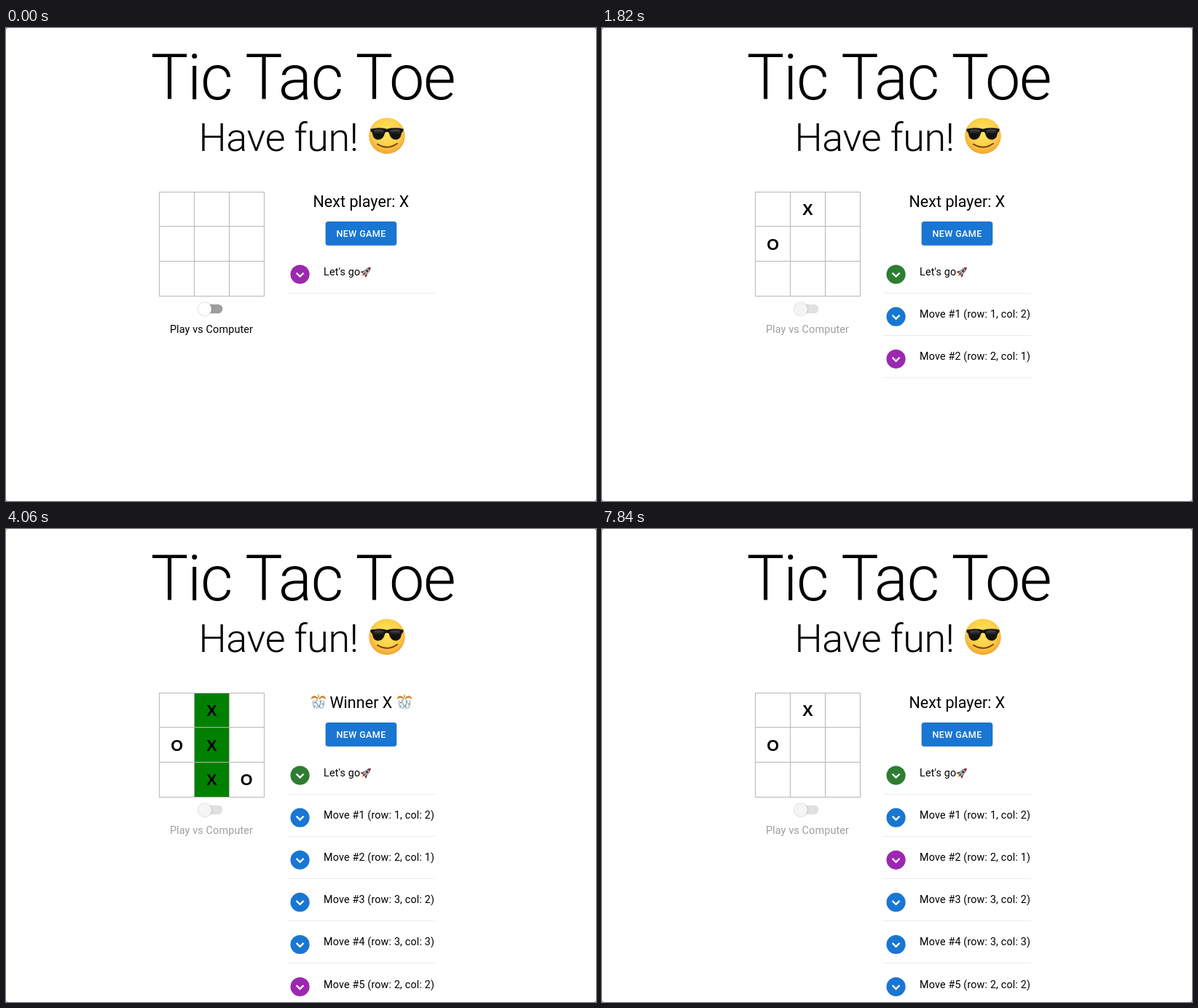
These frames come from a looping animation (810x650 px, 8000 ms). An HTML page:

```html
<!DOCTYPE html>
<html lang="en">
<head>
<meta charset="utf-8">
<title>Tic Tac Toe</title>
<style>
  html, body { margin: 0; width: 100%; height: 100%; overflow: hidden; background: #8a8a8a; }
  svg { display: block; width: 810px; height: 650px; font-family: Roboto, sans-serif; }
  .mid { text-anchor: middle; }
  .h1 { font-size: 86.4px; font-weight: 300; letter-spacing: -.01562em; }
  .h2 { font-size: 54px; font-weight: 300; letter-spacing: -.00833em; }
  .h5 { font-size: 21.6px; }
  .body { font-size: 14.4px; letter-spacing: .00938em; }
  .button { font-size: 12.6px; font-weight: 500; letter-spacing: .02857em; fill: #fff; }
  .mark { font: bold 21.6px "Liberation Sans", Arial, sans-serif; }
  .raised { filter: drop-shadow(0 .8px 1px rgba(0, 0, 0, .28)); }
</style>
</head>
<body>
<svg viewBox="0 0 810 650">
  <defs>
    <radialGradient id="skin" cx=".5" cy=".4" r=".62">
      <stop offset="0" stop-color="#ffe65c"/>
      <stop offset=".6" stop-color="#fdd04a"/>
      <stop offset="1" stop-color="#f0a030"/>
    </radialGradient>
    <linearGradient id="lens" x2="0" y2="1">
      <stop offset="0" stop-color="#4a4a4c"/>
      <stop offset=".5" stop-color="#111"/>
    </linearGradient>
    <g id="popper">
      <circle cx="0" cy="3" r="7.6" fill="#eef2f5"/>
      <path d="M-7 -2Q-9 4-5 9M7 -2Q9 4 5 9" fill="none" stroke="#a9bccb" stroke-width="1.5"/>
      <path d="M-1 -4Q-5 0-2 3T-3 9M2 -3Q5 1 2 4T4 9" fill="none" stroke="#76a7d2" stroke-width="1.1"/>
      <path d="M-1 -5C-5 -11-10 -9-10.5 -3C-7 -6-4 -6-1 -3ZM1 -5C5 -11 10 -9 10.5 -3C7 -6 4 -6 1 -3Z" fill="#dfa044"/>
      <path d="M-9 -5Q-5 -9-1 -5M9 -5Q5 -9 1 -5" fill="none" stroke="#a96f28" stroke-width=".8"/>
      <path d="M0 -10V-5" stroke="#c58a3a" stroke-width="1.3"/>
      <g fill="#d9534f"><circle cx="-5" cy="1" r="1"/><circle cx="1" cy="6" r="1"/><circle cx="6" cy="3" r="1"/></g>
      <g fill="#58a65c"><circle cx="-5" cy="6" r=".9"/><circle cx="3" cy="0" r=".9"/></g>
    </g>
    <g id="rocket" transform="rotate(45)">
      <path d="M-1.6 4L0 9L1.6 4Z" fill="#e59a2c"/>
      <path d="M-2.5 -1L-5.5 4V6L-2 4ZM2.5 -1L5.5 4V6L2 4Z" fill="#7d2a27"/>
      <path d="M0 -10Q4.4 -4 2.6 4.5H-2.6Q-4.4 -4 0 -10Z" fill="#b4b9bf" stroke="#565c63" stroke-width=".8"/>
      <path d="M0 -10Q1.8 -8 2.4 -5.8H-2.4Q-1.8 -8 0 -10Z" fill="#8f302b"/>
      <circle cy="-2.6" r="1.7" fill="#222c3a"/>
      <path d="M0 1V5" stroke="#5c201d" stroke-width="1.4"/>
    </g>
  </defs>

  <rect width="810" height="650" rx="3" fill="#fff"/>
  <text class="h1 mid" x="407.5" y="97.5">Tic Tac Toe</text>
  <text class="h2" x="264.6" y="168.5">Have fun!</text>

  <g transform="translate(523 148.2)">
    <circle r="24.8" fill="url(#skin)"/>
    <path d="M-13 11.5Q1 20 14 10.500" fill="none" stroke="#7a4313" stroke-width="2" stroke-linecap="round"/>
    <g transform="translate(0 -.5) scale(.95 .9)">
      <path d="M-24 -10Q-12 -13 0 -10Q12 -13 24 -10L23.4 -6Q21.5 -6 20.5 -1C19 9 5.5 10 3 -4Q0 -7-3 -4C-5.5 10-19 9-20.5 -1Q-21.5 -6-23.4 -6Z" fill="#151515"/>
      <path d="M-19 -8.5Q-11 -10.5-4.5 -8Q-5 5-12 5Q-19 4-19 -8.5ZM19 -8.5Q11 -10.5 4.5 -8Q5 5 12 5Q19 4 19 -8.5Z" fill="url(#lens)"/>
    </g>
  </g>

  <rect id="win" x="258.5" y="225.5" width="48" height="143" fill="#008000"/>
  <path d="M210.5 225V369M258.5 225V369M306.5 225V369M354.5 225V369M210 225.5H355M210 272.5H355M210 320.5H355M210 368.5H355" fill="none" stroke="#b6b6b6"/>
  <g id="marks" class="mark mid"></g>

  <rect id="track" x="266.8" y="379.7" width="30.6" height="12.6" rx="6.3"/>
  <circle id="thumb" class="raised" cx="273" cy="386.2" r="9"/>
  <text id="label" class="body mid" x="282" y="418.5">Play vs Computer</text>

  <text id="status" class="h5 mid" x="487.4" y="245.7"></text>
  <g id="cheer">
    <use href="#popper" x="429" y="237.5"/>
    <use href="#popper" x="547" y="237.5"/>
  </g>
  <rect class="raised" x="438.8" y="266" width="97.4" height="32.8" rx="3.6" fill="#1976d2"/>
  <text class="button mid" x="487.6" y="287">NEW GAME</text>
  <g id="list"></g>
</svg>

<script>
  const LOOP = 8000;
  // row, column
  const MOVES = [[1, 2], [2, 1], [3, 2], [3, 3], [2, 2]];
  // start in ms, current move, moves listed, track grey
  const STEPS = [
    [0, 0, 0, 158],
    [840, 1, 1, 180],
    [910, 1, 1, 208],
    [1820, 2, 2, 224],
    [2870, 3, 3, 224],
    [3500, 4, 4, 224],
    [4060, 5, 5, 224],
    [6370, 4, 5, 224],
    [7000, 3, 5, 224],
    [7840, 2, 5, 224]
  ];

  const $ = id => document.getElementById(id);
  const show = (el, on) => el.setAttribute("visibility", on ? "visible" : "hidden");
  const player = i => i % 2 ? "O" : "X";

  function add(parent, tag, attrs, text = "") {
    const el = document.createElementNS("http://www.w3.org/2000/svg", tag);
    for (const key in attrs) el.setAttribute(key, attrs[key]);
    el.textContent = text;
    return parent.appendChild(el);
  }

  const marks = MOVES.map(([row, col], i) => add($("marks"), "text", {
    x: 234.6 + (col - 1) * 47.8,
    y: 257 + (row - 1) * 47.7
  }, player(i)));

  const items = [null, ...MOVES].map((move, i) => {
    const group = add($("list"), "g", { transform: `translate(0 ${i * 58.1})` });
    const dot = add(group, "circle", { cx: 403.6, cy: 338.6, r: 13.1 });
    add(group, "path", {
      d: "M7.41 8.59 12 13.17l4.59-4.58L18 10l-6 6-6-6z",
      transform: "translate(392.8 328.4) scale(.9)",
      fill: "#fff",
      stroke: "#fff",
      "stroke-width": .8
    });
    const text = move ? `Move #${i} (row: ${move[0]}, col: ${move[1]})` : "Let's go";
    add(group, "text", { class: "body", x: 436, y: 340 }, text);
    if (!move) add(group, "use", { href: "#rocket", transform: "translate(494 335.5) scale(.92)" });
    const y = 364.5 + Math.round(i * 58.1) - i * 58.1;
    add(group, "path", { d: `M386.5 ${y}H589`, stroke: "#ebebeb" });
    return { group, dot };
  });

  function draw([, now, total, grey]) {
    const won = now === MOVES.length;
    marks.forEach((mark, i) => show(mark, i < now));
    items.forEach(({ group, dot }, i) => {
      show(group, i <= total);
      dot.setAttribute("fill", i === now ? "#9c27b0" : i ? "#1976d2" : "#2e7d32");
    });
    show($("win"), won);
    show($("cheer"), won);
    $("status").textContent = won ? "Winner X" : "Next player: " + player(now);
    $("track").setAttribute("fill", `rgb(${grey}, ${grey}, ${grey})`);
    $("thumb").setAttribute("fill", now ? "#f5f5f5" : "#fff");
    $("label").setAttribute("fill", now ? "#9e9e9e" : "#000");
  }

  let last;
  function tick() {
    const t = performance.now() % LOOP;
    const step = STEPS.findLast(s => s[0] <= t);
    if (step !== last) draw(last = step);
    requestAnimationFrame(tick);
  }
  tick();
</script>
</body>
</html>
```
